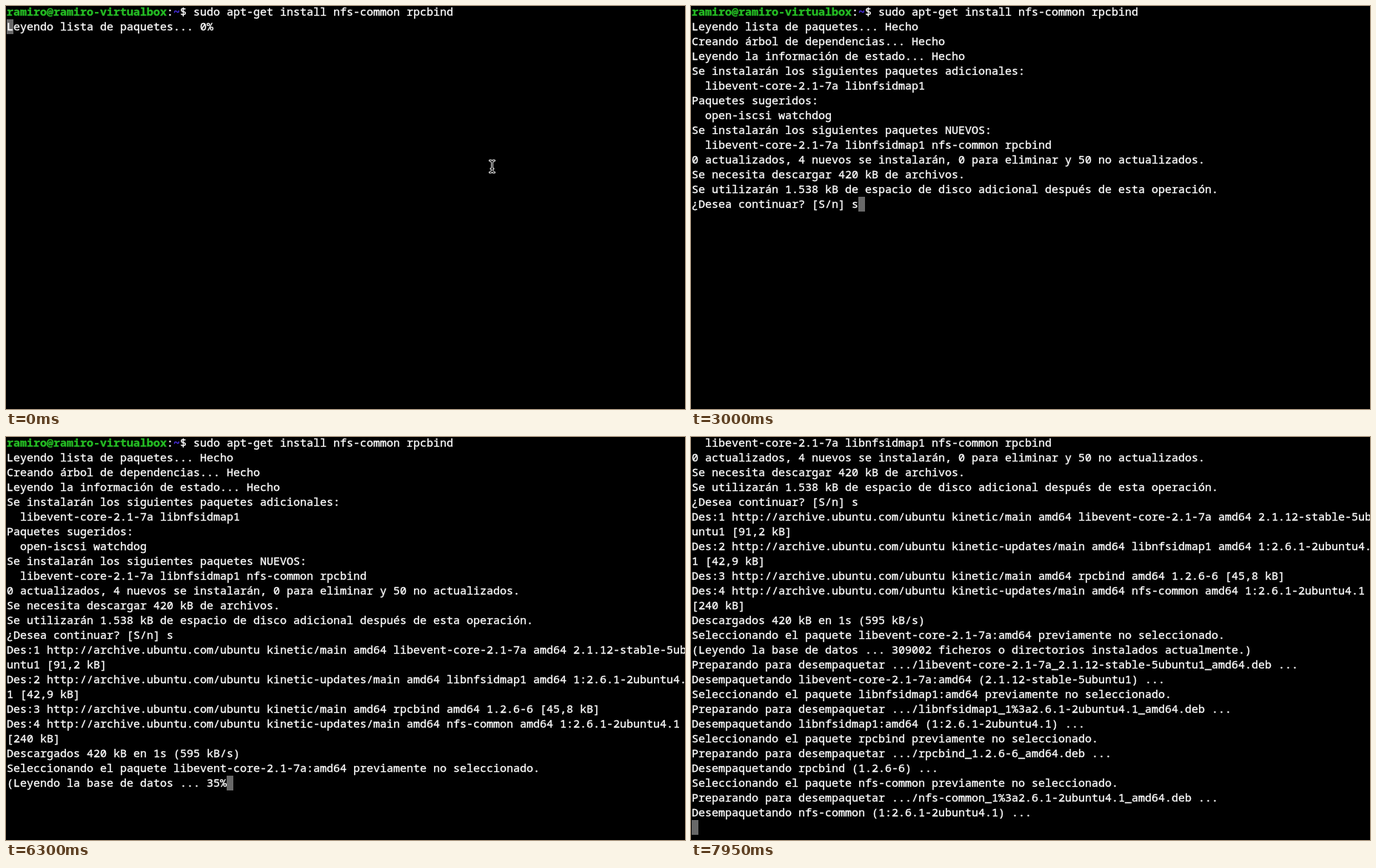
Animation of 917x545 px, one loop 8 s. Source, as an HTML page with a canvas:

```html
<!DOCTYPE html>
<html lang="es">
<head>
<meta charset="utf-8">
<title>Terminal</title>
<style>
html, body { margin: 0; width: 100%; height: 100%; overflow: hidden; background: #000; }
canvas { display: block; }
</style>
</head>
<body>
<canvas id="stage" width="917" height="545"></canvas>
<script>
const ctx = document.getElementById('stage').getContext('2d');
const LOOP = 8000, W = 917, H = 545;
const CELL = 9, LINE = 20, LEFT = 1, TOP = -2, BASE = 15;
const COLS = 102, VISIBLE = 27;
const WHITE = '#fff', GREEN = '#25bc24', BLUE = '#492ee1', CURSOR = '#686868';
const FONT = '15px "Noto Sans Mono", "DejaVu Sans Mono", monospace';

const USER = 'ramiro@ramiro-virtualbox';
const PROMPT = USER + ':~$ ';
const ASK = '¿Desea continuar? [S/n] ';
const SCAN = '(Leyendo la base de datos ... ';
const REPO = 'http://archive.ubuntu.com/ubuntu';

const fetched = (n, suite, pkg, version, size) =>
  `Des:${n} ${REPO} ${suite}/main amd64 ${pkg} amd64 ${version} [${size} kB]`;
const selected = pkg => `Seleccionando el paquete ${pkg} previamente no seleccionado.`;
const preparing = deb => `Preparando para desempaquetar .../${deb}_amd64.deb ...`;
const unpacking = (pkg, version) => `Desempaquetando ${pkg} (${version}) ...`;

const log = [
  PROMPT + 'sudo apt-get install nfs-common rpcbind',
  'Leyendo lista de paquetes... Hecho',
  'Creando árbol de dependencias... Hecho',
  'Leyendo la información de estado... Hecho',
  'Se instalarán los siguientes paquetes adicionales:',
  '  libevent-core-2.1-7a libnfsidmap1',
  'Paquetes sugeridos:',
  '  open-iscsi watchdog',
  'Se instalarán los siguientes paquetes NUEVOS:',
  '  libevent-core-2.1-7a libnfsidmap1 nfs-common rpcbind',
  '0 actualizados, 4 nuevos se instalarán, 0 para eliminar y 50 no actualizados.',
  'Se necesita descargar 420 kB de archivos.',
  'Se utilizarán 1.538 kB de espacio de disco adicional después de esta operación.',
  ASK + 's',
  fetched(1, 'kinetic', 'libevent-core-2.1-7a', '2.1.12-stable-5ubuntu1', '91,2'),
  fetched(2, 'kinetic-updates', 'libnfsidmap1', '1:2.6.1-2ubuntu4.1', '42,9'),
  fetched(3, 'kinetic', 'rpcbind', '1.2.6-6', '45,8'),
  fetched(4, 'kinetic-updates', 'nfs-common', '1:2.6.1-2ubuntu4.1', '240'),
  'Descargados 420 kB en 1s (595 kB/s)',
  selected('libevent-core-2.1-7a:amd64'),
  SCAN + '309002 ficheros o directorios instalados actualmente.)',
  preparing('libevent-core-2.1-7a_2.1.12-stable-5ubuntu1'),
  unpacking('libevent-core-2.1-7a:amd64', '2.1.12-stable-5ubuntu1'),
  selected('libnfsidmap1:amd64'),
  preparing('libnfsidmap1_1%3a2.6.1-2ubuntu4.1'),
  unpacking('libnfsidmap1:amd64', '1:2.6.1-2ubuntu4.1'),
  selected('rpcbind'),
  preparing('rpcbind_1.2.6-6'),
  unpacking('rpcbind', '1.2.6-6'),
  selected('nfs-common'),
  preparing('nfs-common_1%3a2.6.1-2ubuntu4.1'),
  unpacking('nfs-common', '1:2.6.1-2ubuntu4.1')
];

// Break long lines at the terminal width.
const rows = log.flatMap(line => {
  const parts = [];
  for (let i = 0; i < line.length; i += COLS) parts.push(line.slice(i, i + COLS));
  return parts;
});

// Each step: start time, finished rows, text of the live row, cursor column.
const steps = [
  [0, 1, 'Leyendo lista de paquetes... 0%'],
  [150, 2, 'Creando árbol de dependencias... 0%'],
  [300, 3, 'Leyendo la información de estado... 0%'],
  [450, 4],
  [1050, 8],
  [1350, 13],
  [1500, 13, ASK, ASK.length],
  [3000, 13, ASK + 's', ASK.length + 1],
  [4350, 14, '0% [Trabajando]'],
  [4500, 16, '22% [Trabajando]'],
  [4800, 19, '47% [4 nfs-common 11,6 kB/240 kB 5%]'],
  [4950, 21, '100% [Trabajando]'],
  [5100, 22]
];
for (let i = 0; i < 7; i++) {
  const text = SCAN + (5 + 15 * i) + '%';
  steps.push([6000 + 150 * i, 23, text, text.length]);
}
[24, 25, 26, 28, 31, 34, 35].forEach((count, i) => steps.push([7050 + 150 * i, count]));

// A thin outline thickens the strokes like smoothed terminal type.
function drawText(text, col, row, color = WHITE, weight = '') {
  ctx.font = weight + ' ' + FONT;
  ctx.fillStyle = ctx.strokeStyle = color;
  ctx.lineWidth = 0.35;
  ctx.lineJoin = 'round';
  const y = TOP + row * LINE + BASE;
  [...text].forEach((ch, i) => {
    if (ch === ' ') return;
    const x = LEFT + (col + i) * CELL;
    ctx.fillText(ch, x, y);
    ctx.strokeText(ch, x, y);
  });
}

function drawCommand(row) {
  const at = USER.length;
  drawText(USER, 0, row, GREEN, 'bold');
  drawText(':', at, row);
  drawText('~', at + 1, row, BLUE, 'bold');
  drawText(rows[0].slice(at + 2), at + 2, row);
}

function drawPointer(x, y) {
  ctx.save();
  ctx.translate(x, y);
  ctx.lineCap = ctx.lineJoin = 'round';
  ctx.beginPath();
  for (const s of [-1, 1]) {
    ctx.moveTo(-3, 8 * s);
    ctx.quadraticCurveTo(0, 8 * s, 0, 5 * s);
    ctx.quadraticCurveTo(0, 8 * s, 3, 8 * s);
  }
  ctx.moveTo(0, -6);
  ctx.lineTo(0, 6);
  ctx.moveTo(-1.5, 3);
  ctx.lineTo(1.5, 3);
  for (const [color, width] of [['#fff', 3], ['#000', 1.2]]) {
    ctx.strokeStyle = color;
    ctx.lineWidth = width;
    ctx.stroke();
  }
  ctx.restore();
}

function draw(t) {
  const [, count, live = '', col = 0] = steps.findLast(step => step[0] <= t);
  const scroll = Math.max(0, count - VISIBLE + 1);
  const last = count - scroll;

  ctx.fillStyle = '#000';
  ctx.fillRect(0, 0, W, H);
  ctx.fillStyle = CURSOR;
  ctx.fillRect(LEFT + col * CELL, TOP + last * LINE, CELL, LINE);

  for (let i = scroll; i < count; i++) {
    if (i === 0) drawCommand(0);
    else drawText(rows[i], 0, i - scroll);
  }
  drawText(live, 0, last);

  if (t < 150) drawPointer(656.5, 217);
  else if (t < 300) drawPointer(681.5, 226);
  else if (t < 450) drawPointer(706.5, 236);
}

const start = performance.now();
function tick() {
  draw((performance.now() - start) % LOOP);
  requestAnimationFrame(tick);
}
tick();
</script>
</body>
</html>
```
